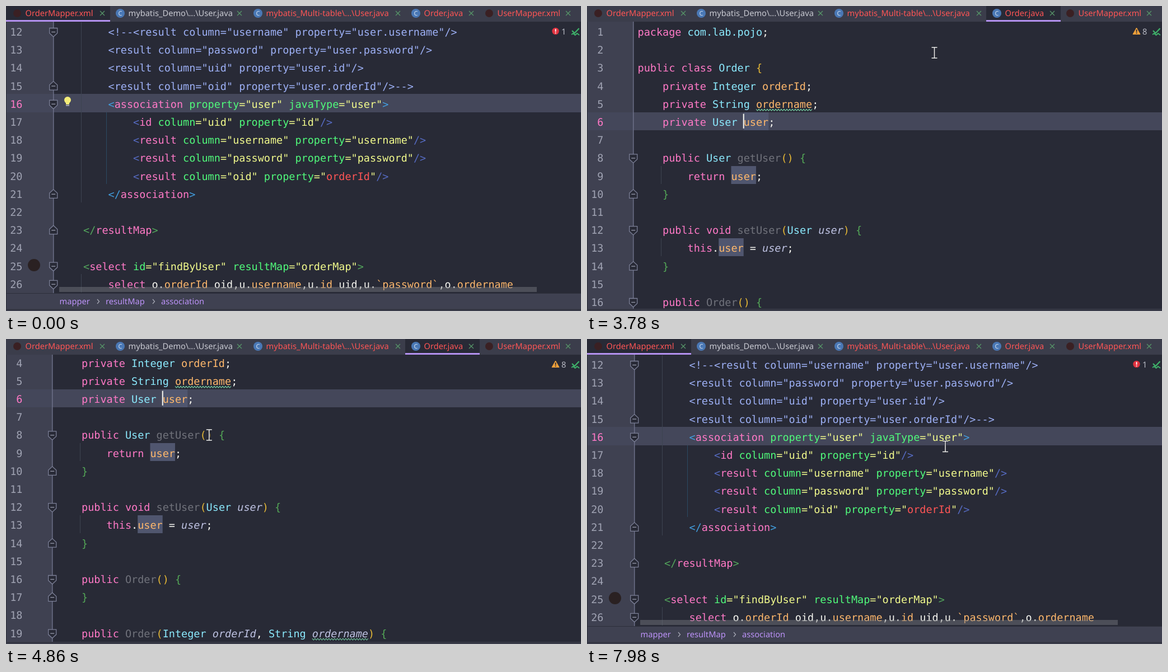
These frames come from a looping animation (1027 by 545 pixels, 8 s). An HTML page with a canvas:

```html
<!DOCTYPE html>
<html lang="en">
<head>
<meta charset="utf-8">
<title>Code editor</title>
<style>
html, body { margin: 0; width: 100%; height: 100%; overflow: hidden; background: #282a36; }
canvas { display: block; }
</style>
</head>
<body>
<canvas id="stage" width="1027" height="545"></canvas>
<script>
const ctx = document.getElementById('stage').getContext('2d');
const W = 1027, LOOP = 8000, TICK = 30;
const ROW = 32.2, TOP = 28.6, CELL = 11.13, BOTTOM = 541;
const MONO = '18.49px "DejaVu Sans Mono", monospace';
const UI = '14.65px "Noto Sans", "Open Sans", sans-serif';
const C = {
  bar: '#3b3d4b', gutter: '#3f4151', editor: '#282a36', row: '#44475a', usage: '#50566f',
  selection: '#666985', edge: '#6c7088', guide: '#3d4350', tagGuide: '#2c4a62',
  number: '#a0a3b3', white: '#f8f8f2',
  pink: '#ff79c6', cyan: '#8be9fd', orange: '#ffb86c', green: '#50fa7b', yellow: '#f1fa8c',
  red: '#ff5555', purple: '#bd93f9', comment: '#9db0f5', unused: '#70727b', param: '#bfc3e3',
  paren: '#e8ba36', brace: '#54a857'
};

const xmlLines = `        <!--<result column="username" property="user.username"/>
        <result column="password" property="user.password"/>
        <result column="uid" property="user.id"/>
        <result column="oid" property="user.orderId"/>-->
        <association property="user" javaType="user">
            <id column="uid" property="id"/>
            <result column="username" property="username"/>
            <result column="password" property="password"/>
            <result column="oid" property="orderId"/>
        </association>

    </resultMap>

    <select id="findByUser" resultMap="orderMap">
        select o.orderId oid,u.username,u.id uid,u.\`password\`,o.ordername`.split('\n');

const javaLines = `package com.lab.pojo;

public class Order {
    private Integer orderId;
    private String ordername;
    private User user;

    public User getUser() {
        return user;
    }

    public void setUser(User user) {
        this.user = user;
    }

    public Order() {
    }

    public Order(Integer orderId, String ordername) {
        this.orderId = orderId;
        this.ordername = ordername;
    }

    public Integer getOrderId() {
        return orderId;
    }

    public void setOrderId(Integer orderId) {
        this.orderId = orderId;
    }`.split('\n');

const xmlRules = [
  [/select(?= o)/y, 'pink'],
  [/(?<=")orderId/y, 'red'],
  [/<\/?|\/?>/y, 'bracket'],
  [/(?<=<\/?)\w+/y, 'pink'],
  [/\w+(?==)/y, 'green'],
  [/=?"(?!orderId)[^"]*"|=?"/y, 'yellow'],
  [/(?<=\.)[`\w]+/y, 'orange']
];
const javaRules = [
  [/\b(package|public|class|private|return|void|this)\b/y, 'pink'],
  [/(?<=package )[\w.]+/y, 'cyan'],
  [/\w+(?=\()/y, 'unused'],
  [/(?<=(Integer|String|User) )\w+(?=[,)])|(?<== )\w+/y, 'param'],
  [/(?<=this\.|return |private \w+ )\w+/y, 'orange'],
  [/[A-Z]\w+/y, 'cyan'],
  [/[()]|(?<=class Order )\{/y, 'paren'],
  [/[{}]/y, 'brace']
];

// Splits a line into [column, text, style] tokens.
function tokenize(line, rules) {
  const tokens = [];
  for (let i = 0; i < line.length;) {
    let text = line[i], style = 'white';
    for (const [pattern, name] of rules) {
      pattern.lastIndex = i;
      const match = pattern.exec(line);
      if (match) { text = match[0]; style = name; break; }
    }
    if (text !== ' ') tokens.push([i, text, style]);
    i += text.length;
  }
  return tokens;
}

const xmlDoc = {
  first: 12, x: 93.5, edge: 84, bottom: 513, lines: xmlLines,
  starts: [12, 16, 25, 26], ends: [15, 21, 23],
  guides: [[134, 12, 21, C.guide], [179, 17, 20, C.tagGuide], [134, 26, 26, C.guide]],
  tokens: xmlLines.map((line, i) => i < 4
    ? [[8, line.trim(), 'comment']] : tokenize(line, xmlRules))
};
const javaDoc = {
  first: 1, x: 90.5, edge: 82, bottom: BOTTOM, lines: javaLines,
  starts: [8, 12, 16, 19, 24, 28], ends: [10, 14, 17, 22, 26, 30],
  guides: [[9, 9], [13, 13], [20, 21], [25, 25], [29, 29]].map(rows => [132, ...rows, C.guide]),
  tokens: javaLines.map(line => tokenize(line, javaRules))
};

// Time, x, y of the mouse pointer.
const pointerPath = [
  [150, 932, 118], [270, 604, 212], [420, 604, 212], [600, 637, 165], [840, 534, 230],
  [1140, 604, 288], [1740, 604, 288], [2520, 459.5, 192], [3540, 459.5, 192],
  [3780, 620.5, 83.5], [4320, 600, 160], [4500, 562.8, 210.5], [4860, 362.8, 171.5],
  [5400, 420, 235], [5940, 338, 207], [6240, 240, 180], [6540, 111, 130], [6810, 111, 130],
  [7080, 100, 13], [7200, 100, 13], [7590, 470, 270], [7800, 560, 171], [7980, 640, 192]
];
const scrollPath = [[3810, 0], [4320, 400], [4500, 358.5], [4860, 100], [5160, 0]];

function follow(path, t) {
  if (t <= path[0][0]) return path[0].slice(1);
  const i = path.findIndex(key => key[0] > t);
  if (i < 0) return path[path.length - 1].slice(1);
  const a = path[i - 1], b = path[i];
  const u = (t - a[0]) / (b[0] - a[0]), k = u * u * (3 - 2 * u);
  return a.slice(1).map((v, j) => v + (b[j + 1] - v) * k);
}

function rect(x, y, w, h, color) {
  ctx.fillStyle = color;
  ctx.fillRect(x, y, w, h);
}
function disc(x, y, r, color) {
  ctx.fillStyle = color;
  ctx.beginPath();
  ctx.arc(x, y, r, 0, 7);
  ctx.fill();
}
function text(str, x, y, color, font = UI, align = 'left') {
  ctx.font = font;
  ctx.fillStyle = color;
  ctx.textAlign = align;
  ctx.fillText(str, x, y);
}
function line(points, color, width = 1, fill) {
  ctx.beginPath();
  points.forEach(([x, y]) => ctx.lineTo(x, y));
  if (fill) { ctx.closePath(); ctx.fillStyle = fill; ctx.fill(); }
  ctx.strokeStyle = color;
  ctx.lineWidth = width;
  ctx.stroke();
}

function wave(x, y, width) {
  const points = [];
  for (let i = 0; i * 2.5 <= width; i++) points.push([x + i * 2.5, y + (i % 2 ? 1.4 : -1.4)]);
  line(points, '#72c9a0', 1.1);
}

function drawTabs(active) {
  rect(0, 0, W, 28, C.bar);
  const [from, to] = active === 'xml' ? [0, 186] : [713, 846];
  rect(from, 0, to - from, 28, C.editor);
  rect(from, 25, to - from, 3, '#b391ef');
  const tabs = [
    ['OrderMapper.xml', 20, 172, C.red], ['mybatis_Demo\\...\\User.java', 204, 417, '#c9cad2'],
    ['mybatis_Multi-table\\...\\User.java', 450, 700, C.red],
    ['Order.java', 732, 831, C.red], ['UserMapper.xml', 863, 1004, C.red]
  ];
  for (const [name, x, close, color] of tabs) {
    if (name.endsWith('xml')) disc(x, 13, 7, '#3a2023');
    else {
      disc(x, 13, 8, '#4a78b5');
      text('C', x, 17, '#d5e2f2', '11px "Noto Sans", sans-serif', 'center');
    }
    text(name, x + 14.5, 18, color);
    line([[close - 4, 9], [close + 4, 17]], '#569568', 1.2);
    line([[close - 4, 17], [close + 4, 9]], '#569568', 1.2);
  }
}

function drawFold(x, y, dir) {
  line([[-7, -7], [7, -7], [7, 2], [0, 8.5], [-7, 2]].map(([dx, dy]) => [x + dx, y + dy * dir]),
    '#7b7f96', 1.3, C.editor);
  line([[x - 3.5, y], [x + 3.5, y]], '#9699aa', 1.3);
}

function drawBulb(x, y, color, alert) {
  disc(x, y, 6, color);
  rect(x - 3, y + 5, 6, 3, color);
  rect(x - 3, y + 9, 6, 1.5, '#c4c6cf');
  if (alert) rect(x - 1, y - 4, 2, 5, '#fff');
  if (alert) rect(x - 1, y + 2.5, 2, 2, '#fff');
}

function drawDoc(doc, state) {
  const rowTop = n => TOP + (n - doc.first) * ROW - state.scroll;
  const colX = c => doc.x + c * CELL;
  // Row backgrounds sit on whole pixels.
  const band = (n, left, right, color, last = n) => {
    const top = Math.round(rowTop(n));
    rect(left, top, right - left, Math.round(rowTop(last + 1)) - top, color);
  };

  ctx.save();
  ctx.beginPath();
  ctx.rect(0, 28, W, doc.bottom - 28);
  ctx.clip();
  rect(0, 28, W, doc.bottom, C.editor);
  rect(1, 28, doc.edge - 1, doc.bottom, C.gutter);
  band(state.row, 1, W, C.row);
  for (const [x, first, last, color] of doc.guides) band(first, x, x + 1, color, last);
  for (const [n, from, to, color] of state.marks) band(n, colX(from), colX(to), color);
  if (state.selectFrom !== undefined) {
    for (let n = state.row; n <= 6; n++) {
      const from = n === state.row ? state.selectFrom : 0;
      const left = n === 4 && from < 3 ? doc.edge : colX(from);
      band(n, left, n === 6 ? colX(22) : W, C.selection);
    }
  }
  rect(doc.edge, 28, 1.5, doc.bottom, C.edge);

  doc.tokens.forEach((tokens, i) => {
    const n = doc.first + i, top = rowTop(n), base = top + 24.4;
    if (top > doc.bottom || top < -ROW) return;
    text(n, 29.5, base, n === state.row ? C.pink : C.number, MONO, 'right');
    const bracket = n === 16 || n === 21 ? '#429fe0' : n > 16 && n < 21 ? '#566bc2' : '#53a65c';
    for (const [col, str, style] of tokens) {
      text(str, colX(col), base, style === 'bracket' ? bracket : C[style],
        (style === 'param' ? 'italic ' : '') + MONO);
      if (str === 'ordername' && doc.lines[i].includes('String'))
        wave(colX(col), base + 4, 9 * CELL);
    }
  });
  const folds = (rows, dir) =>
    rows.forEach(n => drawFold(doc.edge + .7, rowTop(n) + 17.9, dir));
  folds(doc.starts, 1);
  folds(doc.ends, -1);
  if (state.caret !== undefined)
    rect(colX(state.caret) - 1, rowTop(state.row) + 3, 2, ROW - 6, C.white);
  ctx.restore();
}

function drawStatus(error) {
  if (error) {
    disc(981.5, 45, 6.2, '#e0323f');
    rect(980.7, 41, 1.8, 5, '#fff');
    rect(980.7, 47.3, 1.8, 1.8, '#fff');
  } else {
    line([[981.5, 39], [988, 50.5], [975, 50.5]], '#f0a13a', 1, '#f0a13a');
    rect(980.7, 42, 1.8, 4.5, '#282a36');
    rect(980.7, 47.5, 1.8, 1.8, '#282a36');
  }
  text(error ? '1' : '8', 992, 50.5, '#b9bbc5');
  line([[1011, 44], [1015.5, 48.5], [1023.5, 40]], '#3fb56b', 2.2);
  line([[1010, 51], [1013, 49], [1016.5, 52], [1020, 49], [1024, 52]], '#3fb56b', 1.8);
}

function drawXml(t) {
  const onResult = t >= 1230 && t < 2670;
  const marks = onResult && t >= 1530 ? [[20, 43, 50, '#606584']] : [];
  drawDoc(xmlDoc, { row: onResult ? 20 : 16, scroll: 0, marks });
  disc(50, 463, 11, '#2a2122');
  if (t < 1230) drawBulb(110, 168, '#f3ec78');
  if (onResult && t >= 1740) drawBulb(110, 296, '#f0524f', true);
  rect(95, 502, 853, 9, 'rgba(120,122,130,.45)');

  rect(0, 513, W, 28, C.gutter);
  rect(0, 513, W, 1, '#2d2f3b');
  const crumbs = [['mapper', 95.5], ['resultMap', 178], ['association', 277]];
  if (t >= 1740 && t < 3090) crumbs.push(['result', 381]);
  crumbs.forEach(([name, x], i) => {
    text(name, x, 533, C.purple);
    if (i) line([[x - 15, 524], [x - 11.5, 528], [x - 15, 532]], '#a9abb8', 1.2);
  });
}

function drawJava(t, [x, y]) {
  const state = {
    row: 6, scroll: follow(scrollPath, t)[0], caret: 17,
    marks: [[6, 17, 21, C.usage], [9, 15, 19, C.usage], [13, 13, 17, C.usage]]
  };
  if (t >= 5970) {
    state.row = Math.max(4, Math.min(6, Math.floor((y - TOP) / ROW) + 1));
    state.caret = state.selectFrom = Math.min(22, Math.round((x - javaDoc.x) / CELL));
    state.marks.shift();
  }
  drawDoc(javaDoc, state);
}

function drawPointer(t, [x, y]) {
  if (t >= 6540 && t < 7230) {
    line([[0, 0], [0, 18], [4.2, 14.3], [7, 21], [10, 19.7], [7.2, 13.2], [12.5, 13]]
      .map(([dx, dy]) => [x + dx, y + dy]), '#33343c', 1, '#fff');
    return;
  }
  for (const [color, width] of [['#20222b', 3], ['#f2f2f2', 1.5]]) {
    line([[x, y - 9.5], [x, y + 9.5]], color, width);
    for (const end of [-9.5, 9.5]) line([[x - 5, y + end], [x + 5, y + end]], color, width);
  }
}

function draw(now) {
  const t = Math.floor(now % LOOP / TICK) * TICK;
  const pointer = follow(pointerPath, t);
  const inJava = t >= 3090 && t < 7140;
  ctx.textRendering = 'geometricPrecision';
  // The selection stays as it was when the drag ended.
  if (inJava) drawJava(t, follow(pointerPath, Math.min(t, 6540)));
  else drawXml(t);
  drawStatus(!inJava);
  drawTabs(inJava ? 'java' : 'xml');
  rect(0, BOTTOM, W, 4, C.bar);
  rect(0, BOTTOM + 1, W, 1, '#2c2e39');
  rect(0, 28, 1, BOTTOM - 28, '#2c2e39');
  if (t >= 150) drawPointer(t, pointer);
}

const start = performance.now();
function frame() {
  draw(performance.now() - start);
  requestAnimationFrame(frame);
}
frame();
</script>
</body>
</html>
```
